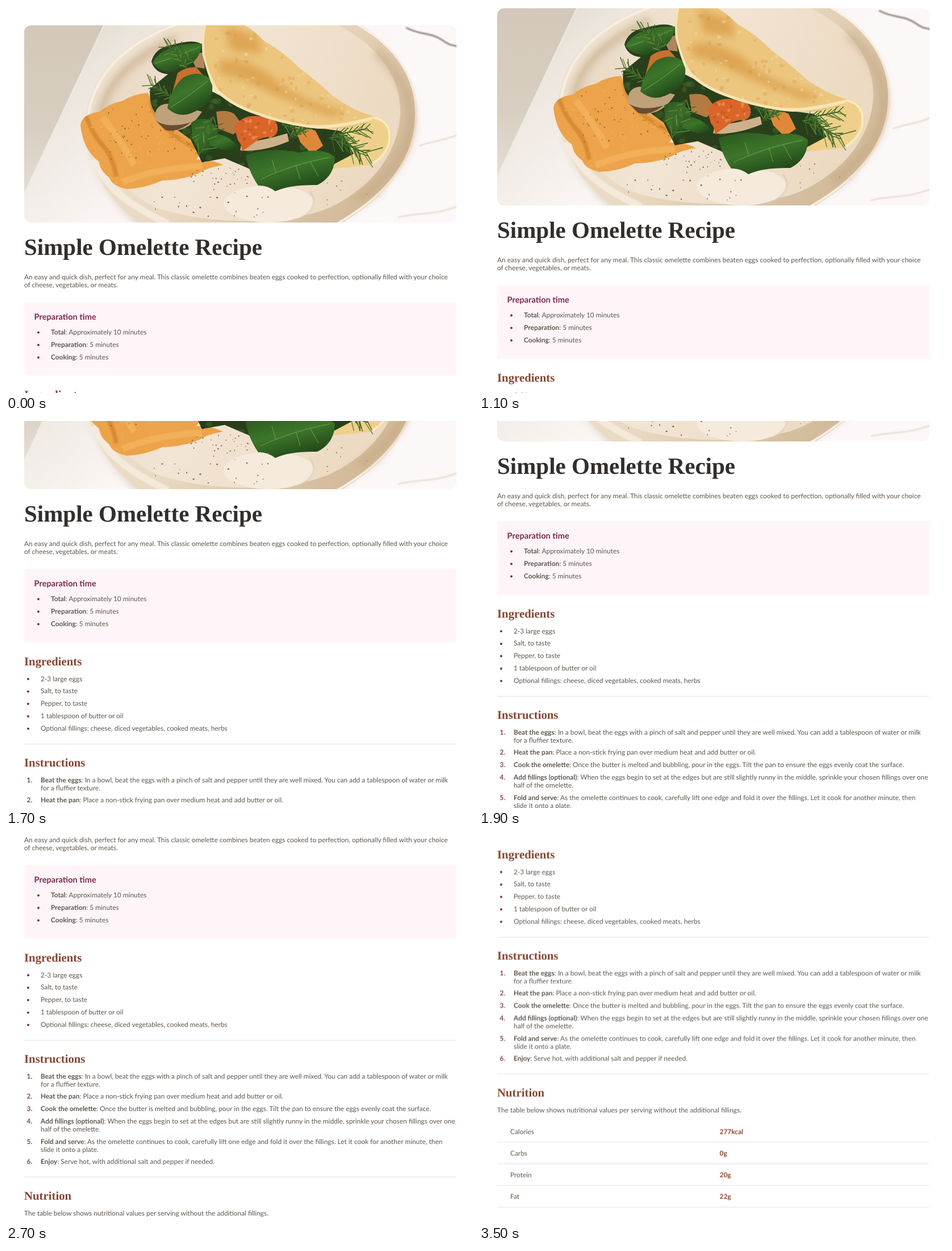
Animation, 822 px wide and 681 px high, one loop 5400 ms. Source, as an HTML page:

```html
<!DOCTYPE html>
<html lang="en">
<head>
<meta charset="utf-8">
<title>Simple Omelette Recipe</title>
<style>
  html, body { margin: 0; width: 100%; height: 100%; overflow: hidden; background: #fff; }
  svg { display: block; width: 100%; height: 100%; overflow: hidden; }
  text { font: 11.9px Lato, "Open Sans", sans-serif; fill: #5f564d; text-rendering: geometricPrecision; white-space: pre; }
  .bold { font-weight: 700; }
  .title { font: 700 41px "Liberation Serif", serif; fill: #312e2c; }
  .section { font: 700 20.8px "Liberation Serif", serif; fill: #854632; }
  .prep { font-size: 14.6px; font-weight: 700; fill: #7b284f; }
  .number { font-weight: 700; fill: #854650; }
  .value { font-weight: 700; fill: #854632; }
</style>
</head>
<body>
<svg>
  <defs>
    <clipPath id="frame"><rect x="32" y="34" width="761" height="347" rx="12"/></clipPath>
    <clipPath id="hummusClip"><use href="#hummus"/></clipPath>
    <clipPath id="greensClip"><use href="#greens"/></clipPath>
    <clipPath id="eggClip"><use href="#egg"/></clipPath>
    <filter id="soft" x="-30%" y="-30%" width="160%" height="160%"><feGaussianBlur stdDeviation="7"/></filter>
    <filter id="fine" x="-10%" y="-10%" width="120%" height="120%"><feGaussianBlur stdDeviation="1.2"/></filter>
    <linearGradient id="marble" x2=".7" y2=".4">
      <stop offset="0" stop-color="#ddd4c7"/><stop offset=".3" stop-color="#ebe5dc"/>
      <stop offset=".8" stop-color="#faf5f3"/><stop offset="1" stop-color="#fcf8f8"/>
    </linearGradient>
    <linearGradient id="wall" x2="0" y2="1">
      <stop offset="0" stop-color="#d3c8b9"/><stop offset=".6" stop-color="#d8cec1"/><stop offset="1" stop-color="#e4ddd4"/>
    </linearGradient>
    <linearGradient id="rim" x2="1" y2=".5">
      <stop offset="0" stop-color="#f1e6d6"/><stop offset=".55" stop-color="#ead9c1"/><stop offset="1" stop-color="#d3bb9b"/>
    </linearGradient>
    <linearGradient id="dish" x2="1" y2=".3">
      <stop offset="0" stop-color="#e6d5bf"/><stop offset=".45" stop-color="#f2e5d4"/><stop offset="1" stop-color="#ecdac2"/>
    </linearGradient>
    <linearGradient id="leaf" x2=".6" y2="1">
      <stop offset="0" stop-color="#2a561f"/><stop offset=".5" stop-color="#3d762a"/><stop offset="1" stop-color="#204519"/>
    </linearGradient>
  </defs>
  <g id="page">
  <g clip-path="url(#frame)">
    <path fill="url(#marble)" d="M32 34h761v347H32z"/>
    <path fill="url(#wall)" d="M32 34H172L32 330z"/>
    <path fill="none" stroke="#efe9e0" stroke-width="2" d="M172 34L32 330"/>
    <g fill="none" filter="url(#fine)">
      <path stroke="#8e8782" stroke-width="3" d="M704 38C730 52 748 46 768 60S785 66 796 72"/>
      <path stroke="#e3d5c2" stroke-width="2" d="M728 246C755 236 770 238 796 226M690 372C730 362 748 370 796 352"/>
    </g>
    <path fill="#bfae98" opacity=".45" filter="url(#soft)" d="M146 215C145 290 190 350 235 390H570L660 330 712 210z"/>
    <path fill="url(#rim)" d="M140 205C141 125 205 62 300 30H618C688 70 724 128 724 192C722 270 672 335 585 385H242C178 345 140 280 140 205z"/>
    <path fill="none" stroke="#f8efe3" stroke-width="4" d="M142 230C140 125 208 66 302 32M618 32C690 72 723 130 722 192C721 270 672 332 583 383"/>
    <path fill="url(#dish)" d="M164 195C168 130 225 80 330 34H585C660 72 696 130 694 190C690 255 650 315 575 352C500 390 330 385 255 350C195 318 162 262 164 195z"/>
    <path fill="none" stroke="#bfa27d" stroke-width="16" opacity=".5" filter="url(#soft)" d="M650 80C742 160 735 265 620 340M160 225C165 135 220 95 300 55"/>
    <path fill="none" stroke="#f7eee2" stroke-width="12" opacity=".8" filter="url(#fine)" d="M152 270C180 322 215 350 285 383"/>
    <ellipse cx="463" cy="348" rx="80" ry="33" fill="#f5eadc"/>
    <path fill="none" stroke="#d8c6ae" stroke-width="2" filter="url(#fine)" d="M535 326C552 350 535 370 500 380"/>

    <path id="hummus" fill="#eca34a" d="M131 210Q133 190 165 186Q180 172 205 167Q226 154 250 153Q258 175 268 200L330 215 348 250 335 270Q365 270 382 280Q355 284 340 294Q314 306 275 307Q245 321 212 322Q186 316 182 302Q165 290 164 274Q136 254 131 210z"/>
    <g clip-path="url(#hummusClip)">
      <path fill="none" stroke="#cd7b27" stroke-width="8" opacity=".6" filter="url(#fine)" d="M140 192Q152 225 170 245T194 300M255 165Q262 215 335 250"/>
      <path fill="none" stroke="#f5b965" stroke-width="12" opacity=".6" filter="url(#fine)" d="M170 196Q205 240 225 280M205 310Q265 285 345 282"/>
      <g id="spice"></g>
    </g>

    <path fill="#efd08b" d="M590 205Q645 188 666 202Q682 215 677 242Q668 270 640 280L570 287z"/>
    <path fill="none" stroke="#fae9bd" stroke-width="4" d="M640 195Q682 200 674 242Q666 266 645 277"/>
    <path id="greens" fill="#293f1b" d="M256 98Q262 72 295 68Q335 56 348 70L362 150 430 185 500 208 590 220 612 260 578 278 520 300 455 300 425 285 385 268 345 275 325 235 270 195Q250 180 254 145L285 120Q262 118 256 98z"/>
    <g id="shade" clip-path="url(#greensClip)"></g>
    <g>
      <path fill="#c8702f" d="M302 118Q318 106 335 108L350 125Q330 130 318 142L292 155z"/>
      <path fill="#b0865c" d="M326 92Q334 82 346 82L350 110 334 108z"/>
      <path fill="#bfa27c" d="M262 196Q262 174 283 172Q320 178 345 186Q322 222 290 219Q270 214 262 196z"/>
      <path fill="#6b4b31" d="M264 202Q285 216 325 205Q300 224 280 218z"/>
      <path fill="#b37a42" d="M370 186Q390 182 402 190L418 212 400 226 374 216z"/>
      <path fill="#cdb18a" d="M415 240Q450 238 495 224L498 238Q450 258 412 254z"/>
      <path fill="#da652a" d="M402 212Q414 196 430 194T462 197Q476 200 478 212T470 230Q450 230 440 238T415 256Q416 245 408 236z"/>
      <path fill="#e0883a" d="M508 213Q530 212 545 220L558 246 538 260 518 240z"/>
      <g id="carrot"></g>
    </g>
    <g fill="url(#leaf)">
      <path d="M258 100Q276 65 345 66Q342 105 292 116Q270 116 258 100z"/>
      <path d="M284 180Q290 145 312 126Q340 110 362 130Q368 165 345 178Q310 204 284 180z"/>
      <path d="M326 205Q355 188 372 218Q378 250 350 262Q326 248 326 205z"/>
      <path d="M358 222Q402 228 412 256Q386 258 358 244z"/>
      <path d="M422 262Q470 247 515 258Q560 248 579 266Q578 300 548 315Q500 314 474 326Q460 315 444 316Q426 290 422 262z"/>
    </g>
    <g fill="none" stroke="#7da85a" stroke-width="1.3" opacity=".6">
      <path d="M290 178Q320 160 355 132M262 101Q300 90 340 72M448 305Q500 280 570 266M475 293L468 270M510 279L518 305M535 273L550 300"/>
    </g>
    <g id="dill" fill="none" stroke-linecap="round" stroke-width="1.4"></g>

    <path id="egg" fill="#ecc67f" d="M350 30H412Q432 38 455 62Q488 80 515 108Q548 132 575 158Q610 184 648 194Q646 205 612 212Q570 220 525 213Q480 206 440 191Q390 174 366 146Q354 120 346 86Q343 60 350 30z"/>
    <g clip-path="url(#eggClip)">
      <path fill="#d6953c" opacity=".65" filter="url(#soft)" d="M385 35L445 55 450 85 395 78zM375 95Q430 90 475 130T600 185L575 195Q500 170 450 145T375 120z"/>
      <g id="toast"></g>
      <path fill="none" stroke="#f8e5b3" stroke-width="6" d="M350 30Q343 60 347 88Q354 120 368 144Q390 172 440 189Q480 204 525 211Q570 218 648 197"/>
    </g>
    <g id="pepper"></g>
  </g>
  <g id="copy"></g>
  </g>
</svg>
<script>
const $ = id => document.getElementById(id);
const rand = (seed => () => (seed = seed * 16807 % 2147483647) / 2147483647)(77);
const between = (a, b) => a + rand() * (b - a);
const repeat = (n, make) => Array.from({ length: n }, (_, i) => make(i)).join('');

// Photograph details
const specks = (n, [x0, y0, x1, y1], size, color, opacity) => repeat(n, () =>
  `<ellipse cx="${between(x0, x1)}" cy="${between(y0, y1)}" rx="${between(.4, 1) * size}" ry="${between(.4, .9) * size}" fill="${color}" opacity="${opacity}"/>`);
$('spice').innerHTML = specks(60, [180, 175, 340, 270], 1.6, '#7b4b20', .7) + specks(80, [140, 170, 370, 320], 3, '#f5b45e', .4);
$('shade').innerHTML = specks(50, [254, 65, 610, 300], 8, '#47702f', .4) + specks(50, [254, 65, 610, 300], 6, '#1b2c12', .6);
$('carrot').innerHTML = specks(14, [415, 200, 468, 232], 4, '#ef9550', .7) + specks(10, [415, 200, 468, 235], 3, '#b5481b', .6);
$('toast').innerHTML = specks(70, [360, 40, 620, 212], 5, '#c98636', .25) + specks(60, [360, 40, 620, 212], 3.5, '#f6dca0', .5);
$('pepper').innerHTML = specks(30, [325, 285, 430, 318], 1.4, '#4b3b2a', .75)
  + specks(24, [260, 318, 490, 372], 1.7, '#5a4630', .75) + specks(8, [560, 295, 640, 350], 1.6, '#6d563c', .7);

const sprig = (x, y, angle, length) => repeat(18, i => {
  const along = length * i / 18, turn = angle + (i % 2 ? 1 : -1) * between(.4, 1);
  const px = x + Math.cos(angle) * along, py = y + Math.sin(angle) * along, reach = between(.2, .45) * length;
  return `<path stroke="${i % 3 ? '#3a6427' : '#5f8a3a'}" d="M${x} ${y}L${px} ${py}l${Math.cos(turn) * reach} ${Math.sin(turn) * reach}"/>`;
});
$('dill').innerHTML = [
  [330, 98, -2.6, 55], [318, 108, -2.2, 40], [292, 160, -2.6, 45], [340, 262, -1.1, 60],
  [365, 195, 2.2, 45], [485, 208, .3, 40], [500, 228, -.4, 32],
  [570, 232, .4, 75], [575, 228, -.2, 65], [585, 225, .75, 55]
].map(s => sprig(...s)).join('');

// Page text
const label = (x, y, str, kind = '') => `<text x="${x}" y="${y}" class="${kind}">${str}</text>`;
const bold = str => `<tspan class="bold">${str}</tspan>`;
const bullet = (x, y) => `<circle cx="${x}" cy="${y - 3.5}" r="2" fill="#7b284f"/>`;
const rule = y => `<path stroke="#e5e0db" d="M32 ${y}H792"/>`;

const times = [['Total', 'Approximately 10 minutes'], ['Preparation', '5 minutes'], ['Cooking', '5 minutes']];
const ingredients = ['2-3 large eggs', 'Salt, to taste', 'Pepper, to taste', '1 tablespoon of butter or oil',
  'Optional fillings: cheese, diced vegetables, cooked meats, herbs'];
const steps = [
  [896.5, 'Beat the eggs', 'In a bowl, beat the eggs with a pinch of salt and pepper until they are well mixed. You can add a tablespoon of water or milk', 'for a fluffier texture.'],
  [932, 'Heat the pan', 'Place a non-stick frying pan over medium heat and add butter or oil.'],
  [954, 'Cook the omelette', 'Once the butter is melted and bubbling, pour in the eggs. Tilt the pan to ensure the eggs evenly coat the surface.'],
  [976, 'Add fillings (optional)', 'When the eggs begin to set at the edges but are still slightly runny in the middle, sprinkle your chosen fillings over one', 'half of the omelette.'],
  [1011.5, 'Fold and serve', 'As the omelette continues to cook, carefully lift one edge and fold it over the fillings. Let it cook for another minute, then', 'slide it onto a plate.'],
  [1047, 'Enjoy', 'Serve hot, with additional salt and pepper if needed.']
];
const nutrition = [['Calories', '277kcal'], ['Carbs', '0g'], ['Protein', '20g'], ['Fat', '22g']];

$('copy').innerHTML = [
  label(32, 438, 'Simple Omelette Recipe', 'title'),
  label(32, 481, 'An easy and quick dish, perfect for any meal. This classic omelette combines beaten eggs cooked to perfection, optionally filled with your choice'),
  label(32, 495, 'of cheese, vegetables, or meats.'),
  '<rect x="32" y="521" width="761" height="129.5" fill="#fff5f9"/>',
  label(49.5, 552, 'Preparation time', 'prep'),
  ...times.map(([name, time], i) => bullet(57, 578 + 22 * i) + label(79, 578 + 22 * i, `${bold(name)}: ${time}`)),
  label(32, 690.5, 'Ingredients', 'section'),
  ...ingredients.map((item, i) => bullet(39, 718.5 + 21.9 * i) + label(61, 718.5 + 21.9 * i, item)),
  rule(829.5),
  label(32, 869, 'Instructions', 'section'),
  ...steps.map(([y, name, line, more], i) => label(36.5, y, `${i + 1}.`, 'number')
    + label(61, y, `${bold(name)}: ${line}`) + (more ? label(61, y + 14, more) : '')),
  rule(1070),
  label(32, 1110, 'Nutrition', 'section'),
  label(32, 1137.5, 'The table below shows nutritional values per serving without the additional fillings.'),
  ...nutrition.map(([name, amount], i) => label(55, 1175.5 + 38.1 * i, name)
    + label(423.5, 1175.5 + 38.1 * i, amount, 'value') + rule(1190 + 38.2 * i))
].join('');

// Scroll position by time in ms
const LOOP = 5400;
const scroll = [
  [0, 0], [900, 1.5], [1000, 16], [1100, 30],
  [1400, 35], [1500, 66], [1600, 165], [1700, 261], [1800, 320], [1900, 345],
  [2200, 370], [2300, 415.5],
  [2500, 428], [2600, 452], [2700, 470], [2800, 477],
  [3200, 481], [3300, 540], [3400, 615], [3500, 651.5], [LOOP, 651.5]
];
$('page').animate(scroll.map(([time, y]) => ({
  offset: time / LOOP, transform: `translateY(${-y}px)`, easing: 'step-end'
})), { duration: LOOP, iterations: Infinity });
</script>
</body>
</html>
```
